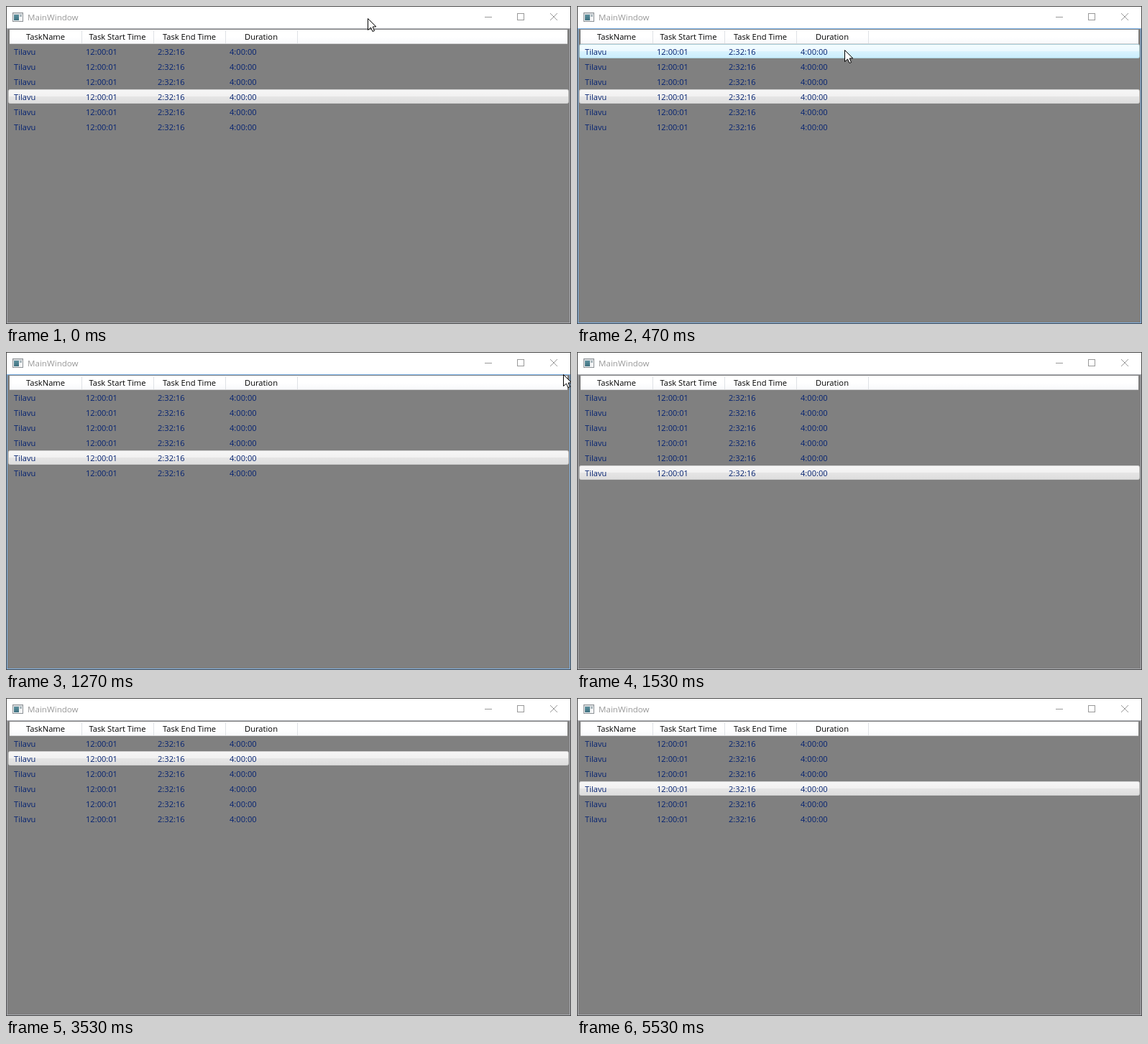
An HTML page with a canvas for the animation above (6.19 s loop, 786 px wide and 443 px high).

```html
<!DOCTYPE html>
<html lang="en">
<head>
<meta charset="utf-8">
<title>MainWindow</title>
<style>
  html, body { margin: 0; width: 100%; height: 100%; overflow: hidden; background: #808080; }
  canvas { display: block; width: 786px; height: 443px; }
</style>
</head>
<body>
<canvas id="stage" width="786" height="443"></canvas>
<script>
const W = 786, H = 443, LOOP = 6190;
const ctx = document.getElementById('stage').getContext('2d');
const FONT = '"Open Sans", "Noto Sans", sans-serif';

const ROWS = 6, ROW_TOP = 53, ROW_STEP = 21, ROW_HEIGHT = 20;
const HEADERS = ['TaskName', 'Task Start Time', 'Task End Time', 'Duration'];
const CELLS = ['Tilavu', '12:00:01', '2:32:16', '4:00:00'];
const SELECTED = { top: '#eeeded', bottom: '#dddddd', border: '#cfcfcf' };
const HOVERED = { top: '#eaf9ff', bottom: '#c9edfd', border: '#aaceda' };

// Pointer stops: start time, x, y; a stop without a place hides it.
const POINTER = [
  [0, 503, 17], [270, 480, 22], [330, 447, 33], [400, 412, 46],
  [470, 372, 61], [530, 262, 190], [600],
  [1270, 775, 31], [1330, 752, 182], [1400, 735, 275], [1460, 724, 375], [1530]
];

function rect(x, y, w, h, fill) {
  ctx.fillStyle = fill;
  ctx.fillRect(x, y, w, h);
}

function frame(x, y, w, h, color) {
  ctx.strokeStyle = color;
  ctx.lineWidth = 1;
  ctx.strokeRect(x + 0.5, y + 0.5, w - 1, h - 1);
}

function fade(y, h, ...colors) {
  const g = ctx.createLinearGradient(0, y, 0, y + h);
  colors.forEach((c, i) => g.addColorStop(i / (colors.length - 1), c));
  return g;
}

function text(str, x, y, size, color, align = 'left') {
  ctx.font = `${size}px ${FONT}`;
  ctx.textAlign = align;
  ctx.fillStyle = color;
  ctx.fillText(str, x, y);
}

function drawTitleBar() {
  rect(0, 0, W, 31, '#ffffff');

  frame(9, 9, 15, 13, '#8d9296');
  rect(10, 10, 13, 2, '#d5d9dc');
  rect(10, 12, 13, 9, '#f4f5f6');
  rect(11, 12, 7, 8, fade(12, 8, '#5b8f9c', '#3f7180'));
  rect(19, 12, 3, 3, '#a9b6bc');
  text('MainWindow', 30, 20, 11.6, '#999999');

  rect(666, 15, 10, 1, '#999999');
  frame(711, 10, 10, 10, '#999999');
  ctx.strokeStyle = '#999999';
  ctx.beginPath();
  ctx.moveTo(757, 10);
  ctx.lineTo(767, 20);
  ctx.moveTo(767, 10);
  ctx.lineTo(757, 20);
  ctx.stroke();
}

function drawHeader() {
  rect(5, 33, 776, 20, fade(33, 20, '#ffffff', '#ffffff', '#f7f8fa'));
  rect(5, 52, 776, 1, '#d5d5d5');
  HEADERS.forEach((name, i) => {
    rect(105 + i * 100, 34, 1, 18, '#dfe2e6');
    text(name, 55 + i * 100, 47, 11.2, '#000000', 'center');
  });
}

function drawBar(index, style) {
  const y = ROW_TOP + index * ROW_STEP;
  ctx.beginPath();
  ctx.roundRect(3.5, y + 0.5, 779, ROW_HEIGHT - 1, 2);
  ctx.fillStyle = fade(y, ROW_HEIGHT, style.top, style.bottom);
  ctx.fill();
  rect(4, y + 1, 778, 9, 'rgba(255,255,255,.46)');
  ctx.strokeStyle = style.border;
  ctx.stroke();
}

function drawRows(selected, hovered) {
  if (hovered >= 0 && hovered !== selected) drawBar(hovered, HOVERED);
  drawBar(selected, SELECTED);
  for (let r = 0; r < ROWS; r++) {
    CELLS.forEach((cell, c) =>
      text(cell, 11 + c * 100, 68 + r * ROW_STEP, 11.1, '#042271'));
  }
}

function drawPointer(x, y) {
  ctx.save();
  ctx.translate(x + 0.5, y + 0.5);
  ctx.beginPath();
  [[0, 0], [0, 16], [4, 12.5], [6.5, 18], [9, 17], [6.7, 11.5], [11.3, 11.3]]
    .forEach(p => ctx.lineTo(...p));
  ctx.closePath();
  ctx.fillStyle = '#ffffff';
  ctx.fill();
  ctx.strokeStyle = '#000000';
  ctx.stroke();
  ctx.restore();
}

function hoveredRow(y) {
  const row = Math.floor((y - ROW_TOP) / ROW_STEP);
  return row >= 0 && row < ROWS ? row : -1;
}

function draw(t) {
  const [, x, y] = POINTER.filter(p => p[0] <= t).pop();
  const visible = x !== undefined;
  const inList = visible && y >= 31;
  // The selection moves down one row each second, first at 530 ms.
  const selected = (3 + Math.floor((t + 470) / 1000)) % ROWS;

  rect(0, 0, W, H, '#808080');
  drawTitleBar();
  frame(1, 31, 784, 411, inList ? '#7eb4ea' : '#abadb3');
  drawHeader();
  drawRows(selected, inList ? hoveredRow(y) : -1);
  frame(0, 0, W, H, '#484848');
  if (visible) drawPointer(x, y);
}

const start = performance.now();
function tick() {
  draw((performance.now() - start) % LOOP);
  requestAnimationFrame(tick);
}
tick();
</script>
</body>
</html>
```
